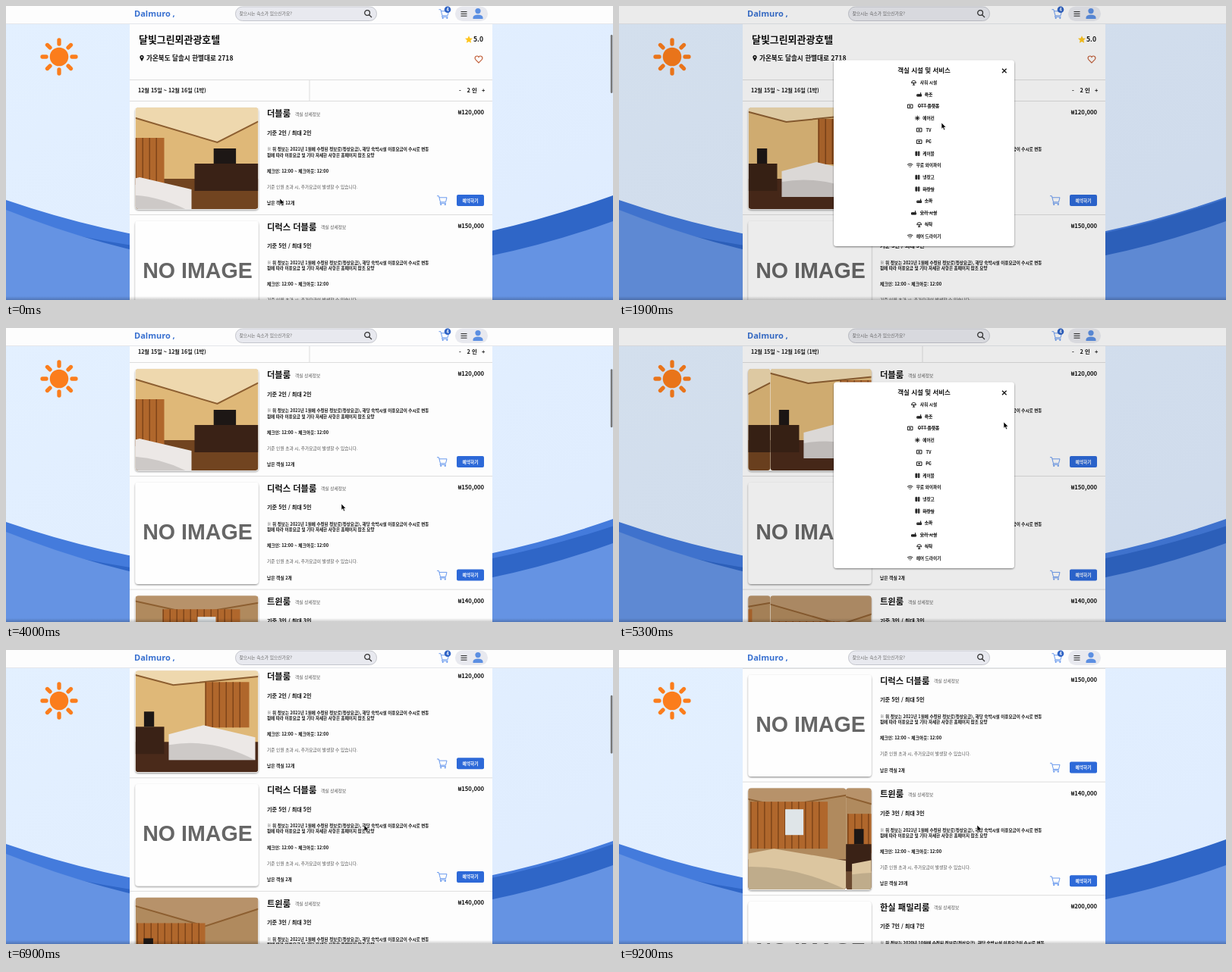
Recreate the animation shown at these times as an HTML page. Size 800 px wide and 388 px high, loop 9300 ms.

```html
<!DOCTYPE html>
<html lang="ko">
<head>
<meta charset="utf-8">
<style>
html, body { margin: 0; width: 100%; height: 100%; overflow: hidden; background: #e1eeff; }
svg { display: block; }
text { font-family: "Noto Sans CJK KR", "Noto Sans CJK", "Noto Sans", sans-serif; white-space: pre; }
.logo { font-family: "Noto Sans", sans-serif; }
.blank { font: bold 28.6px "Liberation Sans", Arial, sans-serif; }
</style>
</head>
<body>
<svg id="stage" width="800" height="388" viewBox="0 0 800 388"></svg>
<script>
const LOOP = 9300, PITCH = 149.6, PHOTO_W = 162, PHOTO_H = 134;
const END = 'text-anchor="end"', MID = 'text-anchor="middle"';

const repeat = (n, draw) => Array.from({ length: n }, (_, i) => draw(i)).join('');
const rect = (x, y, w, h, fill, extra = '') =>
  `<rect x="${x}" y="${y}" width="${w}" height="${h}" fill="${fill}" ${extra}/>`;
const circle = (x, y, r, fill) => `<circle cx="${x}" cy="${y}" r="${r}" fill="${fill}"/>`;
const shape = (d, fill, extra = '') => `<path d="${d}" fill="${fill}" ${extra}/>`;
const line = (d, color, w = 1, extra = '') => shape(d, 'none', `stroke="${color}" stroke-width="${w}" ${extra}`);
const move = (x, y, body) => `<g transform="translate(${x} ${y})">${body}</g>`;
// y is the visual middle of the line of text
const text = (x, y, size, str, fill = '#111', weight = 700, extra = '') =>
  `<text x="${x}" y="${y + size * .37}" font-size="${size}" font-weight="${weight}" fill="${fill}" ${extra}>${str}</text>`;
const gradient = (id, from, to, dir) => `<linearGradient id="${id}" ${dir}>` +
  `<stop stop-color="${from}"/><stop offset="1" stop-color="${to}"/></linearGradient>`;

const cart = (x, y) => move(x, y,
  line('M0 .7H2.4L4.5 8.8H11.5L13 2.8H3M4.5 8.8L4 10.3H12', '#6a9aee') +
  circle(5.2, 12, 1.1, '#6a9aee') + circle(10.8, 12, 1.1, '#6a9aee'));

// A simple hotel room: ceiling meeting at a corner, wood or curtain panel, desk, bed
function photo({ wall, ceiling, floor, corner: [cx, cy], panel: [px, py, pw, ph], desk: [dx, dw], bed: [bx, by, bw, bh], cloth, pane }) {
  const edge = `0 ${cy * .3}L${cx} ${cy}L${PHOTO_W} ${cy * .4}`;
  return rect(0, 0, PHOTO_W, PHOTO_H, wall) + shape(`M0 0L${edge}V0Z`, ceiling) + line('M' + edge, '#8d5f31', 2) +
    rect(0, 94, PHOTO_W, 40, floor) + rect(px, py, pw, ph, '#b0672c') +
    repeat(Math.floor(pw / 9), i => rect(px + 9 * i, py, 1.5, ph, '#7f4519')) +
    (pane ? rect(px + pw / 2 - 5, py + 10, 24, 34, '#dfe5e8') : '') +
    rect(dx, 74, dw, 36, '#3a2216') + rect(dx + dw * .3, 54, dw * .35, 20, '#1d1715') +
    shape(`M${bx} ${by + 12}L${bx + bw * .4} ${by}L${bx + bw} ${by + 16}V${by + bh}H${bx}Z`, cloth) +
    shape(`M${bx} ${by + 26}Q${bx + bw / 2} ${by + 16} ${bx + bw} ${by + bh}H${bx}Z`, '#0002');
}
const warm = { wall: '#dfb878', ceiling: '#eed8ae', cloth: '#ece8e6' };
const tan = { wall: '#b08a5e', ceiling: '#b7926a', floor: '#6b4a30', cloth: '#dcc6a0' };
const doubleRoom = [
  { ...warm, floor: '#714420', corner: [108, 46], panel: [0, 40, 38, 62], desk: [78, 84], bed: [-40, 92, 114, 46] },
  { ...warm, floor: '#4a2a1a', corner: [50, 19], panel: [92, 15, 58, 60], desk: [0, 38], bed: [44, 72, 114, 46] }
];
const twinRoom = [
  { ...tan, corner: [76, 24], panel: [36, 18, 102, 62], desk: [0, 32], bed: [4, 80, 158, 54], pane: true },
  { ...tan, corner: [92, 38], panel: [2, 34, 90, 52], desk: [0, 36], bed: [8, 88, 154, 46] }
];

const rooms = [
  { name: '더블룸', guests: 2, price: 120, left: 12, date: '2021년 1월', photos: doubleRoom },
  { name: '디럭스 더블룸', guests: 5, price: 150, left: 2, date: '2021년 1월' },
  { name: '트윈룸', guests: 3, price: 140, left: 29, date: '2021년 1월', photos: twinRoom },
  { name: '한실 패밀리룸', guests: 7, price: 200, left: 3, date: '2020년 10월' }
];

function card({ name, guests, price, left, date, photos }, i) {
  const picture = photos
    ? photos.map((p, k) => `<g class="slide" data-k="${k}" clip-path="url(#round)">${photo(p)}</g>`).join('')
    : rect(0, 0, PHOTO_W, PHOTO_H, '#fefefe') + `<text class="blank" x="82" y="75.500" fill="#666" ${MID}>NO IMAGE</text>`;
  return move(0, i * PITCH,
    rect(170.5, 134.5, PHOTO_W, PHOTO_H, '#fff', 'rx="4" filter="url(#soft)"') +
    move(170.5, 134, `<g clip-path="url(#round)">${picture}</g>`) +
    text(344, 142, 11.25, name) +
    text(name.length > 3 ? 415 : 381, 142.5, 5.75, '객실 상세정보', '#555', 400) +
    text(630, 140.5, 7.7, `₩${price},000`, '#111', 700, END) +
    text(344, 167, 7.15, `기준 ${guests}인 / 최대 ${guests}인`) +
    text(344, 189.3, 5.55, `※ 위 정보는 ${date}에 수정된 정보로(정상요금), 해당 숙박시설 이용요금이 수시로 변동`) +
    text(344, 196.5, 5.55, '됨에 따라 이용요금 및 기타 자세한 사항은 홈페이지 참조 요망') +
    text(344, 217.7, 5.72, '체크인: 12:00 ~ 체크아웃: 12:00') +
    text(344, 238.7, 5.72, '기준 인원 초과 시, 추가요금이 발생할 수 있습니다.', '#555', 400) +
    text(344, 260, 5.72, `남은 객실 ${left}개`) +
    cart(568, 250) + rect(594, 249, 36, 15, '#2d69d8', 'rx="2"') +
    text(612, 256.5, 5.72, '예약하기', '#fff', 700, MID) +
    line('M163 275.5H641', '#ddd'));
}

// Icon outlines on a 24-unit grid
const icons = {
  dome: 'M3 13a9 9 0 0 1 18 0zM12 13V21M7 21H17',
  tub: 'M3 12H21V19H3zM5 14H19M5 17H19M18 12V4',
  screen: 'M2 5H22V19H2zM10 9L15 12L10 15z',
  fan: 'M12 2V22M2 12H22M5 5L19 19M19 5L5 19',
  blocks: 'M5 4H10V20H5zM15 4H20V20H15zM7 6V18M17 6V18',
  air: 'M1 9Q12 0 23 9M5 14Q12 7 19 14M10 18H14'
};
const services = [
  ['샤워 시설', 'dome'], ['욕조', 'tub', 'off'], ['OTT 플랫폼', 'screen', 'off'], ['에어컨', 'fan'],
  ['TV', 'screen'], ['PC', 'screen', 'off'], ['케이블', 'blocks'], ['무료 와이파이', 'air'], ['냉장고', 'blocks'],
  ['화장실', 'blocks', 'off'], ['소파', 'tub', 'off'], ['요리 시설', 'tub', 'off'], ['식탁', 'dome', 'off'], ['헤어 드라이기', 'air']
];
const service = ([label, icon, off], i) => {
  const y = 101.2 + 15.6 * i;
  return move(396.5 - 2.4 * label.length, y - 4, line(icons[icon], '#000', 2.8, 'transform="scale(.33)"')) +
    text(408, y, 5.65, label, '#111', 700, MID + (off ? ' text-decoration="line-through"' : ''));
};

const sun = circle(70, 67, 12.3, '#fb7d1c') + repeat(8, i =>
  line('M70 50V45', '#fb7d1c', 5.3, `stroke-linecap="round" transform="rotate(${i * 45} 70 67)"`));

const star = 'M' + Array.from({ length: 10 }, (_, i) => {
  const a = i * Math.PI / 5, r = i % 2 ? 2.5 : 5.3;
  return `${610 + r * Math.sin(a)} ${44.5 - r * Math.cos(a)}`;
}).join('L') + 'Z';

const hotel =
  text(175, 44, 12.95, '달빛그린뫼관광호텔') +
  shape('M179 73L176.700 69A2.700 2.700 0 1 1 181.300 69Z', '#111') + circle(179, 67.6, 1, '#fff') +
  text(185, 69.3, 8.6, '가온북도 달솔시 한별대로 2718') +
  shape(star, '#ffc51e') + text(629, 44.3, 8.6, '5.0', '#111', 700, END) +
  line('M623 75L618.800 70.600C616.500 67.500 621 63.800 623 67.600C625 63.800 629.500 67.500 627.200 70.600Z', '#c2613c', 1.1) +
  line('M163 97.500H641M400 98V125M163 125.500H641', '#ddd') +
  text(174, 111.2, 7.1, '12월 15일 ~ 12월 16일 (1박)') +
  text(597, 111, 7.4, '-') + text(607.5, 111, 7.4, '2 인') + text(627, 111, 7.4, '+');

const header =
  rect(0, 0, 800, 23, '#fdfdfd') + line('M0 23.500H800', '#e4e6ea') +
  text(169, 9.5, 11, 'Dalmuro ,', '#3870d0', 700, 'class="logo"') +
  rect(302.5, 1, 186, 18.5, '#e8e9ef', 'rx="9" stroke="#b9bbc3" stroke-width=".8"') +
  text(307.5, 10, 5.75, '찾으시는 숙소가 있으신가요?', '#666', 400) +
  line('M479.500 9a3.400 3.400 0 1 0-6.800 0a3.400 3.400 0 1 0 6.800 0M478.600 11.600L482 15', '#333', 1.3) +
  cart(570.5, 4) + circle(582, 4.8, 4.3, '#2f63c5') + text(582, 4.8, 5.5, '4', '#fff', 700, MID) +
  rect(592, .5, 43, 19.5, '#e8e9ef', 'rx="9.700"') +
  repeat(3, i => rect(599.5, 7 + 2.8 * i, 8, 1.1, '#333')) +
  circle(622, 6.6, 3.6, '#5c8fe2') + shape('M615.500 17V15Q616 11.500 622 11.500T628.500 15V17Z', '#5c8fe2');

const modalBox =
  rect(0, 0, 800, 388, '#000', 'opacity=".07"') +
  rect(283, 71.5, 238, 245.5, '#fff', 'rx="4" filter="url(#soft)"') +
  text(402, 84.5, 8.5, '객실 시설 및 서비스', '#111', 700, MID) +
  line('M505 82.700l5.600 5.600m0-5.600l-5.600 5.600', '#111', 1.3) +
  services.map(service).join('');

const wave = (left, dip, right) => `M0 ${left}Q400 ${dip} 800 ${right}V388H0Z`;

const $ = id => document.getElementById(id);
$('stage').innerHTML = '<defs>' +
  gradient('sky', '#e3f0ff', '#dfecfe', 'x2="1" y2="1"') + gradient('foot', '#0000', '#0003', 'x2="0" y2="1"') +
  `<clipPath id="round"><rect width="${PHOTO_W}" height="${PHOTO_H}" rx="4"/></clipPath>` +
  '<filter id="soft" x="-10%" y="-10%" width="120%" height="125%"><feDropShadow dx="0" dy="1" stdDeviation="1" flood-opacity=".5"/></filter></defs>' +
  rect(0, 0, 800, 388, 'url(#sky)') + sun +
  shape(wave(256, 393, 252), '#447bdc') + shape('', '#2f66c7', 'id="swell"') + shape(wave(269, 428, 284), '#6593e3') +
  rect(163, 0, 478, 388, '#fdfdfd') +
  `<g id="page">${hotel}${rooms.map(card).join('')}</g>` + header +
  rect(796.8, 0, 2.6, 77, '#777', 'id="thumb" rx="1.300"') +
  `<g id="modal">${modalBox}</g>` + rect(0, 383, 800, 5, 'url(#foot)') +
  shape('M0 0V8.300L1.900 6.600L3.200 9.700L4.700 9.100L3.400 6.100L6 6Z', '#000', 'id="cursor" stroke="#fff" stroke-width=".6"');
const page = $('page'), thumb = $('thumb'), modal = $('modal'), cursor = $('cursor'), swell = $('swell');
const slides = document.querySelectorAll('.slide');

// Cursor stops: seconds, x, y
const stops = [[0, 361, 254], [1, 398, 142], [1.9, 425, 154], [2.5, 507, 85], [4, 442, 232],
  [4.5, 430, 212], [5.3, 507, 124], [5.7, 507, 85], [6.5, 472, 231]];

const smooth = (t, from, to) => {
  const p = Math.min(1, Math.max(0, (t - from) / (to - from)));
  return p * p * (3 - 2 * p);
};
const between = (t, from, to) => t >= from && t < to;
const show = (el, on) => el.style.display = on ? '' : 'none';

// Each leg adds its own share of the way
const cursorAt = (t, axis) => stops.reduce((v, stop, i) =>
  i ? v + (stop[axis] - stops[i - 1][axis]) * smooth(t, stops[i - 1][0], stop[0]) : stop[axis], 0);

// The CSS "ease" curve, cubic-bezier(.25, .1, .25, 1)
function ease(p) {
  let lo = 0, hi = 1, u;
  for (let i = 0; i < 20; i++) {
    u = (lo + hi) / 2;
    if (.75 * u * (1 - u) + u ** 3 < p) lo = u; else hi = u;
  }
  return .3 * u * (1 - u) ** 2 + 3 * u * u * (1 - u) + u ** 3;
}

function slideAt(t) {
  const period = 2.04, start = .96, n = Math.floor((t - start) / period);
  return n < 0 ? 0 : n + ease(Math.min(1, (t - start - n * period) / .5));
}

function draw() {
  const t = Math.floor(performance.now() % LOOP / 100) / 10;
  const scroll = 80 * smooth(t, 3, 3.7) + 171 * smooth(t, 6.7, 7.5);
  page.setAttribute('transform', `translate(0 ${-scroll})`);
  thumb.setAttribute('y', 38 + scroll * .203);
  cursor.setAttribute('transform', `translate(${cursorAt(t, 1)} ${cursorAt(t, 2)})`);
  show(thumb, t < .6 || between(t, 3, 4.5) || between(t, 6.6, 8.2));
  show(modal, between(t, 1.1, 2.6) || between(t, 4.6, 5.8));
  swell.setAttribute('d', wave(280, 393, 256 - 6 * Math.cos(t / 9.3 * 2 * Math.PI)));

  const position = slideAt(t), n = Math.floor(position);
  slides.forEach(s => {
    const place = n % 2 === +s.dataset.k ? 0 : 1;
    s.setAttribute('transform', `translate(${(place - position + n) * PHOTO_W} 0)`);
  });
  requestAnimationFrame(draw);
}
draw();
</script>
</body>
</html>
```
